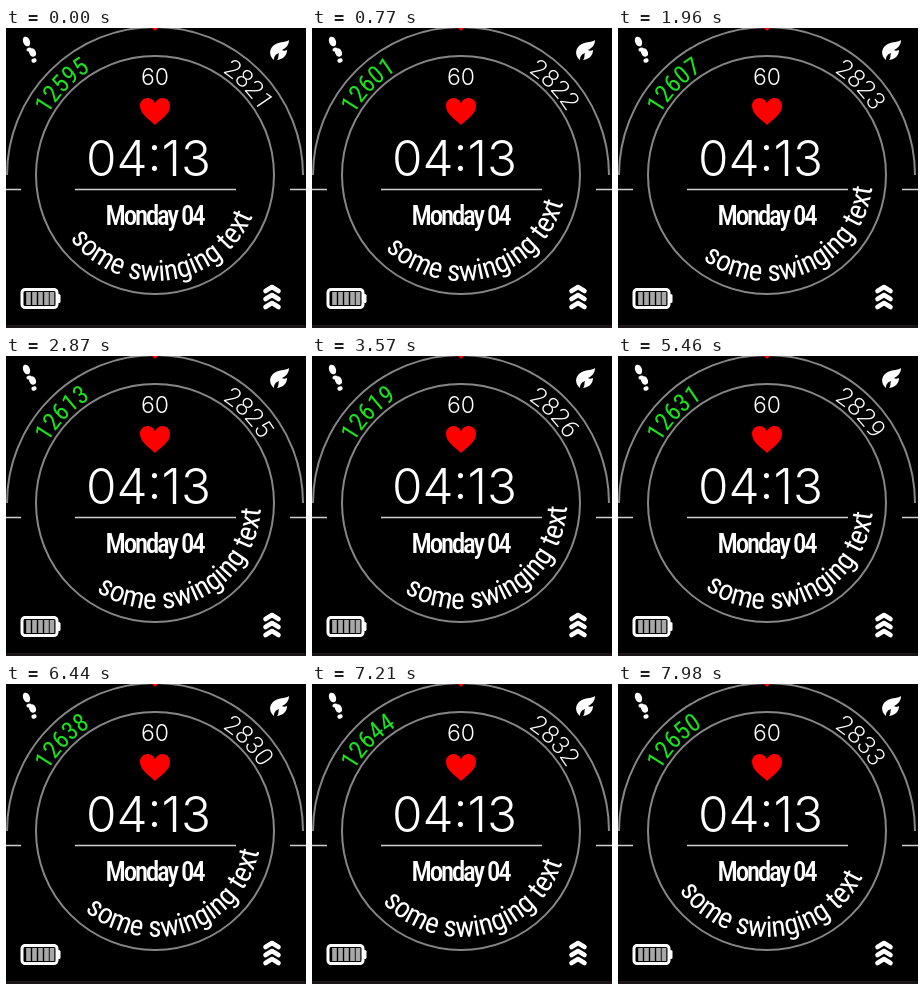
An HTML page that plays this animation: 300 by 300 pixels, repeating every 8 s.

```html
<!DOCTYPE html>
<html lang="en">
<head>
<meta charset="utf-8">
<title>Watch face</title>
<style>
  html, body { margin: 0; width: 100%; height: 100%; overflow: hidden; background: #000; }
  svg { display: block; width: 100vw; height: 100vh; }
  text { font-family: Roboto, "Open Sans", sans-serif; fill: #fff; text-anchor: middle; }
  .line { fill: none; stroke: #868686; stroke-width: 2; }
  .wide { font-family: Inter, Roboto, sans-serif; font-weight: 300; }
  .narrow { font-family: "Roboto Condensed", Roboto, sans-serif; font-stretch: 75%; }
  #date { font-weight: 450; letter-spacing: -.08em; }
  #steps { fill: #1be31b; }
</style>
</head>
<body>
<svg viewBox="0 0 300 300">
  <defs>
    <path id="upper" d="M26 147A123 123 0 0 1 272 147"/>
    <path id="lower" d="M43 147A106 106 0 0 0 255 147"/>
    <path id="heart" d="M0 14C-5 9-15 3-15-5C-15-14-4-16 0-8C4-16 15-14 15-5C15 3 5 9 0 14Z"/>
    <path id="chevron" d="M-6.500 3.500L0-.500L6.500 3.500"/>
  </defs>
  <rect width="300" height="300"/>
  <rect y="297" width="300" height="3" fill="#1b1517"/>

  <g class="line">
    <circle cx="149" cy="147" r="119"/>
    <path d="M1 147A148 148 0 0 1 297 147"/>
    <path d="M69 161.500H230M0 161.500H15M284 161.500H300" stroke="#d0d0d0" stroke-width="1.600"/>
  </g>

  <g fill="#f00">
    <use href="#heart" x="149" y="83"/>
    <use href="#heart" transform="translate(149 -2) scale(.34)"/>
  </g>

  <!-- footprints -->
  <g fill="#fff">
    <ellipse cx="20.500" cy="13.500" rx="3.400" ry="5" transform="rotate(-22 20.500 13.500)"/>
    <ellipse cx="23" cy="21.500" rx="2.600" ry="1.900" transform="rotate(-22 23 21.500)"/>
    <ellipse cx="26.500" cy="24.500" rx="3.300" ry="4.400" transform="rotate(-22 26.500 24.500)"/>
    <ellipse cx="28" cy="32.500" rx="2.600" ry="2.200" transform="rotate(-22 28 32.500)"/>
  </g>

  <!-- flame -->
  <path fill="#fff" d="M283 12C279 15 272 13 267 18C263 22 263 28 268 32C268 28 270 26 273 25C272 28 273 30 271 32C278 31 281 27 281 22C279 23 277 23 276 22C280 20 283 17 283 12Z"/>

  <!-- battery -->
  <rect x="16" y="261.500" width="35" height="18" rx="3" fill="none" stroke="#fff" stroke-width="3"/>
  <rect x="51" y="266" width="3.500" height="9" rx="1.500" fill="#fff"/>
  <path d="M22.500 264V277M28.500 264V277M34.500 264V277M40.500 264V277M46 264V277" stroke="#a8a8a8" stroke-width="4.600"/>

  <g fill="none" stroke="#fff" stroke-width="4.600" stroke-linecap="round" stroke-linejoin="round">
    <use href="#chevron" x="266" y="259.500"/>
    <use href="#chevron" x="266" y="267.500"/>
    <use href="#chevron" x="266" y="275.500"/>
  </g>

  <text class="wide" x="149" y="57" font-size="23">60</text>
  <text class="wide" id="clock" x="142.500" y="148">04:13</text>
  <text class="narrow" id="date" x="148.500" y="196.500">Monday 04</text>

  <g transform="rotate(-46 149 147)">
    <text class="narrow" font-size="25"><textPath id="steps" href="#upper" startOffset="50%">12595</textPath></text>
  </g>
  <g transform="rotate(46 149 147)">
    <text font-size="25" font-weight="350"><textPath id="calories" href="#upper" startOffset="50%">2821</textPath></text>
  </g>
  <g id="swing">
    <text class="narrow" id="caption"><textPath href="#lower" startOffset="50%">some swinging text</textPath></text>
  </g>
</svg>
<script>
  const LOOP = 8000, TICK = 70;
  const FIRST_UPDATE = 560, UPDATE_EVERY = 850;
  const $ = id => document.getElementById(id);

  // Choose the font size at which the text has the wanted width.
  function fit(id, width, maxSize) {
    const el = $(id);
    el.style.fontSize = maxSize + 'px';
    const size = maxSize * width / el.getComputedTextLength();
    el.style.fontSize = Math.min(maxSize, size) + 'px';
  }

  function setText(id, value) {
    if ($(id).textContent !== String(value)) $(id).textContent = value;
  }

  function draw(ms) {
    const t = Math.floor(ms % LOOP / TICK) * TICK;
    const updates = Math.max(0, Math.floor((t - FIRST_UPDATE) / UPDATE_EVERY) + 1);
    setText('steps', 12595 + Math.floor(6.13 * updates + 0.1));
    setText('calories', 2821 + Math.floor(1.35 * updates + 0.27));

    // Slow to a stop, then fall back with constant acceleration.
    const s = (t - 3870) / 1000;
    const angle = -28 + 1.4 * s * s;
    $('swing').setAttribute('transform', `rotate(${angle} 149 147)`);
  }

  fit('clock', 125, 50);
  fit('date', 98, 32);
  fit('caption', 223, 31);

  const start = performance.now();
  function frame() {
    draw(performance.now() - start);
    requestAnimationFrame(frame);
  }
  frame();
</script>
</body>
</html>
```
